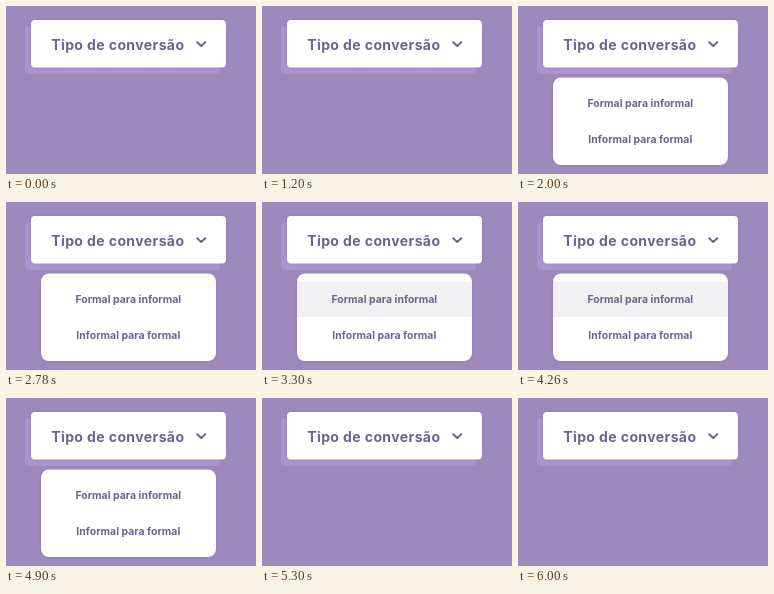
An HTML page that plays this animation: 250 by 168 pixels, repeating every 6300 ms.

```html
<!DOCTYPE html>
<html lang="pt">
<head>
<meta charset="utf-8">
<title>Tipo de conversão</title>
<style>
  html, body { margin: 0; width: 100%; height: 100%; overflow: hidden; background: #9d8abd; }
  svg { display: block; width: 250px; height: 168px; }
  text { fill: #6f628b; font-family: Inter, "Open Sans", sans-serif; font-weight: 700; text-anchor: middle; }
  .title { font-size: 14px; letter-spacing: .4px; }
  .option { font-size: 10.4px; letter-spacing: .05px; }
  .raised { filter: drop-shadow(0 0 1.5px rgba(70, 50, 110, .18)); }
  #menu, #hover { opacity: 0; }
</style>
</head>
<body>
<svg viewBox="0 0 250 168">
  <rect width="250" height="168" fill="#9d8abd"/>
  <rect x="19" y="20" width="195" height="48" rx="4" fill="#a994cf"/>
  <rect class="raised" x="25" y="14" width="195" height="47.5" rx="4" fill="#fff"/>
  <text class="title" x="111.8" y="43.5">Tipo de conversão</text>
  <path d="M191.2 36.2 L195.2 40 L199.2 36.2" fill="none" stroke="#6f628b" stroke-width="2" stroke-linecap="round" stroke-linejoin="round"/>
  <g id="menu">
    <rect class="raised" x="35" y="71.5" width="175" height="87.5" rx="8" fill="#fff"/>
    <rect id="hover" x="35" y="80" width="175" height="35" fill="#f1f0f3"/>
    <text class="option" x="122.3" y="101.3">Formal para informal</text>
    <text class="option" x="122.3" y="137">Informal para formal</text>
  </g>
</svg>
<script>
  const LOOP = 6300;
  const visible = { menu: [2000, 5300], hover: [3300, 4900] };

  for (const [id, [start, end]] of Object.entries(visible)) {
    const steps = [[0, 0], [start, 1], [end, 0], [LOOP, 0]];
    const anim = document.getElementById(id).animate(
      steps.map(([time, opacity]) => ({ opacity, offset: time / LOOP, easing: "step-end" })),
      { duration: LOOP, iterations: Infinity }
    );
    anim.startTime = document.timeline.currentTime;
  }
</script>
</body>
</html>
```
